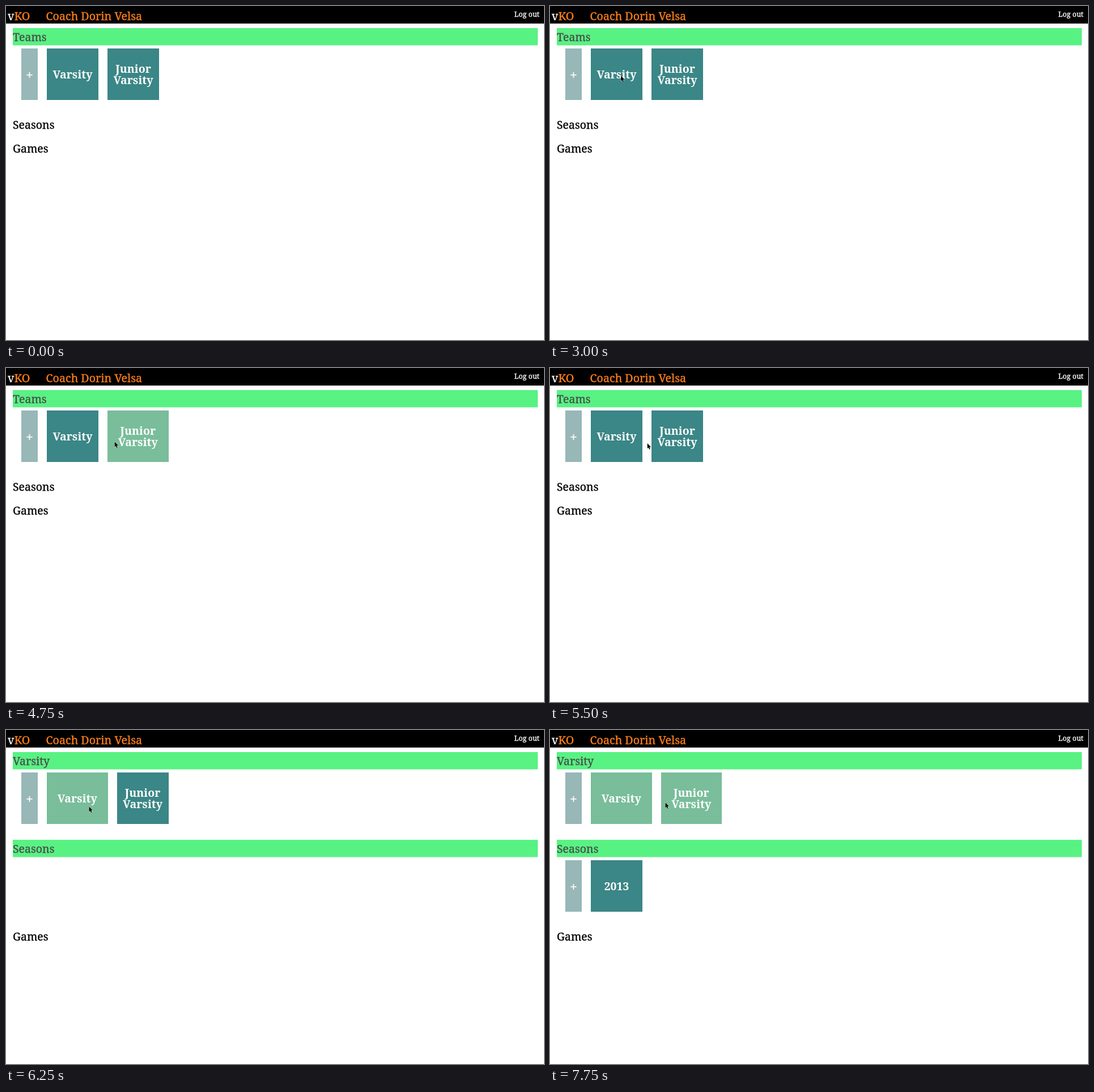
Animation, 949 px wide and 590 px high, one loop 8 s. Source, as an HTML page:

```html
<!DOCTYPE html>
<html lang="en">
<head>
<meta charset="utf-8">
<title>Team picker</title>
<style>
  html, body { margin: 0; width: 100%; height: 100%; overflow: hidden; background: #fff; }
  svg { display: block; font: 19.5px "Noto Serif", serif; }
  .medium { stroke-width: .35; }
  .brand { font-size: 19.7px; fill: #ff7f1a; stroke: #ff7f1a; }
  .white { fill: #fff; stroke: #fff; }
  .tile { font-weight: 600; fill: #fff; text-anchor: middle; }
</style>
</head>
<body>
<svg width="949" height="590" viewBox="0 0 949 590">
  <rect width="949" height="31"/>
  <text class="medium brand" x="3" y="25"><tspan class="white">v</tspan>KO</text>
  <text class="medium brand" x="70.5" y="25">Coach Dorin Velsa</text>
  <text class="medium white" x="941" y="19" text-anchor="end" font-size="12.5">Log out</text>
  <g id="page"></g>
  <path id="cursor" d="M1 .8V10L3 8.2L4.5 11.5L6.1 10.9L4.7 7.6H7.4Z" stroke="#fff" stroke-width=".9" paint-order="stroke"/>
</svg>
<script>
const LOOP = 8000, STEP = 250;
const TEAL = '#3b8686', MINT = '#79bd9a', PALE = '#98b7b7', GREEN = '#58f283';
const page = document.getElementById('page');
const cursor = document.getElementById('cursor');

const glide = p => Math.sin(p * Math.PI / 2);
const smooth = p => p * p * (3 - 2 * p);

// The pointer enters from the top, then sweeps between the tiles.
const moves = [
  { start: 1500, end: 3000, from: [124, 8], to: [124, 122.5], ease: glide },
  { start: 3500, end: 5000, from: [124, 122.5], to: [196, 130], ease: smooth },
  { start: 5000, end: 6000, from: [196, 130], to: [145.5, 134.5], ease: smooth },
  { start: 6750, end: 7750, from: [145.5, 134.5], to: [202.5, 127.5], ease: smooth }
];

function pointerAt(t) {
  const move = moves.filter(({ start }) => start <= t).pop();
  if (!move) return null;
  const { start, end, from, to, ease } = move;
  const p = ease(Math.min(1, (t - start) / (end - start)));
  return from.map((value, i) => value + (to[i] - value) * p);
}

const box = (x, y, w, h, fill) =>
  `<rect x="${x}" y="${y}" width="${w}" height="${h}" fill="${fill}"/>`;

function heading(label, y, open) {
  const ink = open ? '#4a4a4a' : '#000';
  return (open ? box(12, y, 926, 30.5, GREEN) : '') +
    `<text class="medium" x="12" y="${y + 22.7}" fill="${ink}" stroke="${ink}">${label}</text>`;
}

function tile({ lines, fill, size = 19.5 }, x, y, w) {
  const left = Math.round(x);
  const middle = y + 46 + size * .36;
  return box(left, y, Math.round(x + w) - left, 91, fill) + lines.map((line, i) =>
    `<text class="tile" font-size="${size}" x="${x + w / 2}" y="${
      middle + (i - (lines.length - 1) / 2) * 20.5}">${line}</text>`).join('');
}

const addButton = { lines: ['+'], fill: PALE, size: 24, width: 29 };
const option = (lines, lit) => ({ lines, fill: lit ? MINT : TEAL, width: lit ? 107.5 : 91 });

function row(y, items) {
  let x = 27;
  return [addButton, ...items].map(item => {
    const shape = tile(item, x, y, item.width);
    x += item.width + 16;
    return shape;
  }).join('');
}

function drawPage(t) {
  const chosen = t >= 6250;
  const varsityLit = (t >= 3750 && t < 4750) || t >= 5750;
  const juniorLit = (t >= 4750 && t < 5500) || t >= 7750;
  const sections = [
    { label: chosen ? 'Varsity' : 'Teams', open: true,
      items: [option(['Varsity'], varsityLit), option(['Junior', 'Varsity'], juniorLit)] },
    { label: 'Seasons', open: chosen, items: t >= 6500 && [option(['2013'], false)] },
    { label: 'Games', open: false }
  ];
  let y = 39;
  return sections.map(({ label, open, items }) => {
    const shape = heading(label, y, open) + (open && items ? row(y + 36, items) : '');
    y += open ? 155 : 42;
    return shape;
  }).join('');
}

let shown = '';
function render(now) {
  const t = Math.floor(now % LOOP / STEP) * STEP;
  const markup = drawPage(t);
  if (markup !== shown) page.innerHTML = shown = markup;

  const spot = pointerAt(t);
  cursor.style.display = spot ? '' : 'none';
  if (spot) cursor.setAttribute('transform', `translate(${spot})`);
}

const start = performance.now();
function tick() {
  render(performance.now() - start);
  requestAnimationFrame(tick);
}
tick();
</script>
</body>
</html>
```
